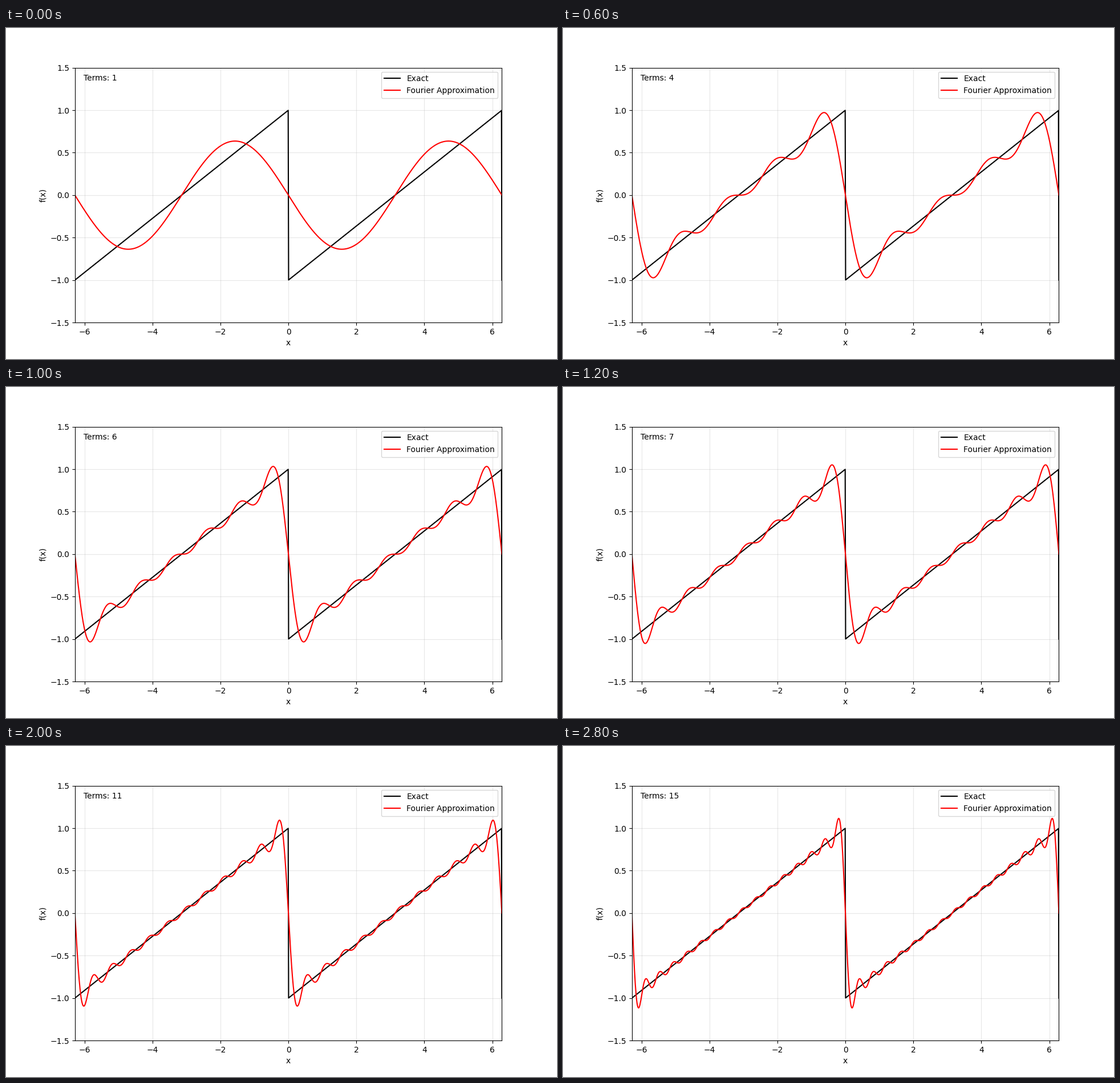
Recreate the animation shown at these times as a matplotlib script. Size 966 px wide and 580 px high, loop 3 s.

```python
import numpy as np
import matplotlib.pyplot as plt
from matplotlib.animation import FuncAnimation

plt.rcParams["font.family"] = "DejaVu Sans"

TERMS = 15
PERIOD = 2 * np.pi

x = np.linspace(-PERIOD, PERIOD, 1000)
sawtooth = np.mod(x, PERIOD) / np.pi - 1


def partial_sum(count):
    n = np.arange(1, count + 1)[:, None]
    return -2 / np.pi * np.sum(np.sin(n * x) / n, axis=0)


fig, ax = plt.subplots(figsize=(9.66, 5.8), dpi=100)
ax.plot(x, sawtooth, color="black", label="Exact")
approx, = ax.plot(x, partial_sum(1), color="red", label="Fourier Approximation")
caption = ax.text(0.02, 0.95, "Terms: 1", transform=ax.transAxes)

ax.set_xlim(-PERIOD, PERIOD)
ax.set_ylim(-1.5, 1.5)
ax.set_xlabel("x")
ax.set_ylabel("f(x)")
ax.grid(alpha=0.3)
ax.legend(loc="upper right")


def update(frame):
    count = frame + 1
    approx.set_ydata(partial_sum(count))
    caption.set_text(f"Terms: {count}")
    return approx, caption


anim = FuncAnimation(fig, update, frames=TERMS, interval=200, repeat=True, repeat_delay=0)
plt.show()
```
